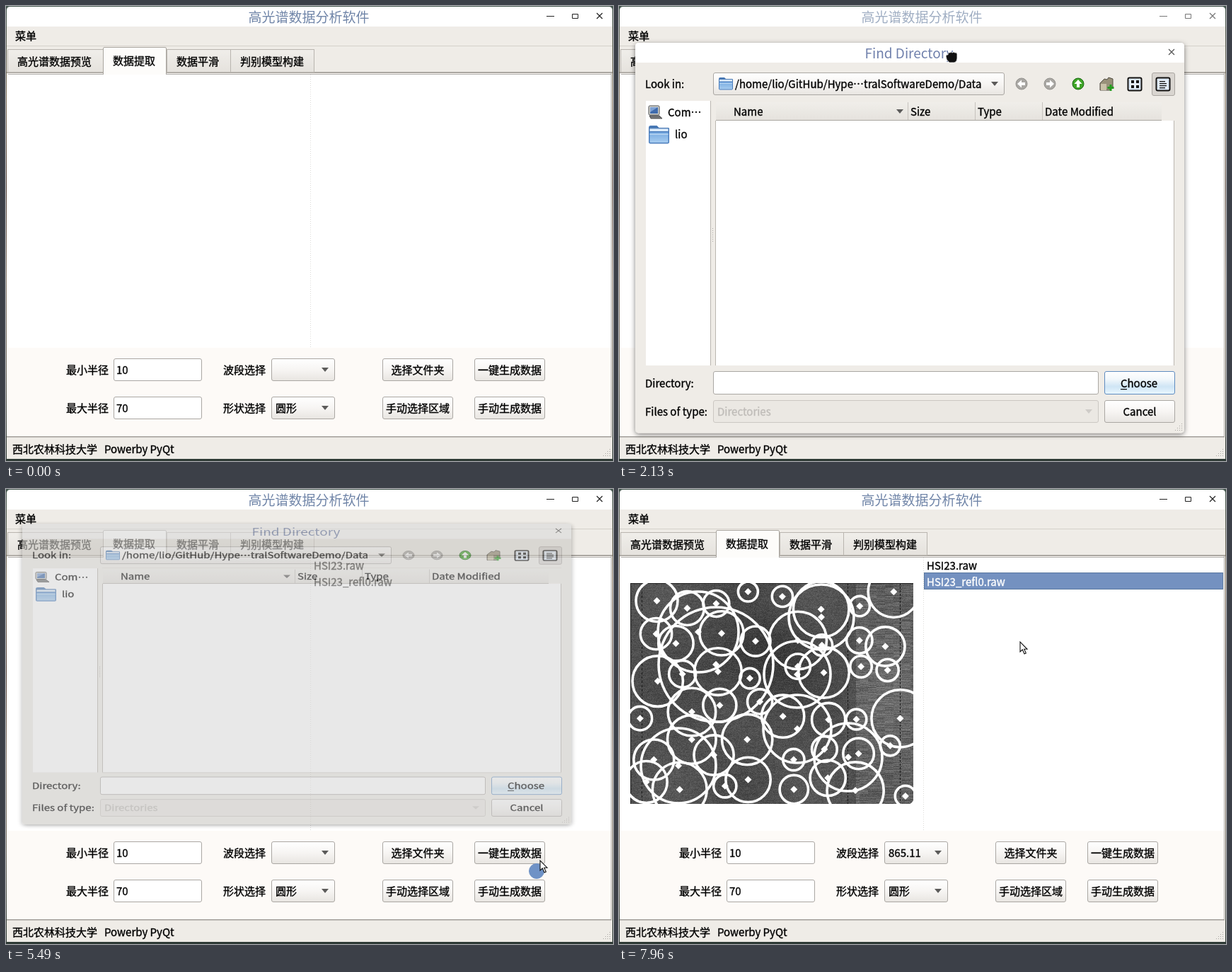
An HTML page with a canvas for the animation above (8 s loop, 858x643 px).

```html
<!DOCTYPE html>
<html lang="zh-CN">
<head>
<meta charset="utf-8">
<title>高光谱数据分析软件</title>
<style>
html, body { margin: 0; width: 100%; height: 100%; overflow: hidden; background: #4a4c45; }
svg { position: absolute; left: 0; top: 0; }
canvas { position: absolute; left: 16px; top: 133px; }
text {
  font: 15px "Noto Sans CJK SC", "Noto Sans CJK", "Noto Sans", sans-serif; font-weight: 500; white-space: pre;
  fill: currentColor; stroke: currentColor; stroke-width: .35px;
}
.title { font-size: 19px; font-weight: 400; text-anchor: middle; stroke: none; }
.mid { text-anchor: middle; }
</style>
</head>
<body>
<svg id="stage" width="858" height="643" viewBox="0 0 858 643"></svg>
<canvas id="scan" width="400" height="312"></canvas>
<script>
const LOOP = 8000;
const USER = 'lio';
const DEMO = `/home/${USER}/GitHub/HyperspectralSoftwareDemo`;

// ---- drawing helpers ----
const times = (n, make) => Array.from({ length: n }, (_, i) => make(i)).join('');
const rect = (x, y, w, h, fill, more = '') =>
  `<rect x="${x}" y="${y}" width="${w}" height="${h}" fill="${fill}" ${more}/>`;
const text = (x, y, s, more = '') => `<text x="${x}" y="${y + 5.5}" ${more}>${s}</text>`;
const title = (x, y, s, more) => text(x, y + 1.5, s, `class="title" ${more}`);
const path = (d, more = '') => `<path d="${d}" ${more}/>`;
const line = (d, color, w = 1) => path(d, `fill="none" stroke="${color}" stroke-width="${w}"`);
const box = (x, y, w, h, fill, stroke, r = 2.5, more = '') =>
  rect(x + .5, y + .5, w - 1, h - 1, fill, `stroke="${stroke}" rx="${r}" ${more}`);
const group = (id, body, more = '') => `<g id="${id}" ${more}>${body}</g>`;
const at = (x, y, body, s = 1) => `<g transform="translate(${x} ${y}) scale(${s})">${body}</g>`;
const ramp = (id, ...colors) => `<linearGradient id="${id}" x2="0" y2="1">` + colors.map((c, i) =>
  `<stop offset="${i / (colors.length - 1)}" stop-color="${c}"/>`).join('') + '</linearGradient>';

const arrow = (x, y, color = '#5c5b5a') => path(`M${x - 5} ${y - 3}h10l-5 6z`, `fill="${color}"`);
const button = (x, y, w, label) =>
  box(x, y, w, 32, 'url(#btn)', '#aaa7a3') + text(x + w / 2, y + 16, label, 'class="mid"');
const combo = (x, y, w, label) => box(x, y, w, 32, 'url(#btn)', '#aaa7a3') + label + arrow(x + w - 14, y + 16);
const field = (x, y, w, h, more = '') => box(x, y, w, h, '#fff', '#aaa7a3', 2.5, more);
const dots = (x, y, n) => times(n, i => rect(x, y + i * 3, 1, 1, '#aaa7a3'));
const grip = (x, y) => times(4, i => dots(x + i * 3, y + 9 - i * 3, i + 1));

// ---- icons ----
const folder = (x, y, s) => at(x, y,
  path('M0 2q0-2 2-2h6l2 2h9q1 0 1 1v4H0z', 'fill="#4878b4"') +
  rect(1, 3, 18, 4, '#dcebfa') +
  rect(.5, 6, 19, 11, 'url(#fold)', 'stroke="#4a7dbd" rx="1"') + rect(1, 8, 18, 1, '#b9d6f2'), s);
const computer = (x, y) => at(x, y,
  rect(1, 1, 15, 13, '#d4d5d0', 'stroke="#4b4d4f" rx="1.5"') + rect(3, 3, 11, 9, '#3f6bac') +
  path('M3 3h11l-11 7z', 'fill="#7da0d3"') +
  path('M2 15h14l4 4H4z', 'fill="#77787a" stroke="#333" stroke-width=".8"'));
const drive = (x, y) => at(x, y, rect(1, 0, 18, 19, '#c4d5e8', 'stroke="#7b93b0" rx="2"') +
  rect(4, 2, 12, 9, '#9bb9dc') + times(4, i => rect(4 + i * 3, 14, 1.5, 3, '#71879f')));
const newFolder = (x, y) => at(x, y,
  path('M1 8l6-6 4 1 2-3 6 2v12l-5 4H1z', 'fill="#99917a" stroke="#504c42"') +
  path('M2 9h8v9H2z', 'fill="#c9c1a8"') + line('M16 10v9m-4.500-4.500h9', '#269b20', 3));
const disc = (x, color, edge, turn) => at(x, 110,
  `<circle r="8" fill="${color}" stroke="${edge}"/>` +
  path('M0-6L-5.500 0h3.500v5h4V0h3.500z', `fill="#fff" transform="rotate(${turn})"`));
const view = (x, marks) => box(x - 10, 101, 20, 19, '#fff', '#111', 2, 'stroke-width="2"') +
  box(x - 8, 103, 16, 15, '#e6eff8', '#c9dcf0', 1) + marks;
const cross = (x, y) => path(`M${x - 4} ${y - 4}l8 8m0-8l-8 8`, 'fill="none" stroke="currentColor" stroke-width="1.2"');

// ---- main window ----
const tab = (x, w, label) => rect(x + .5, 61.5, w, 32, 'url(#tab)', 'stroke="#b9b5af"') + text(x + 14, 78, label);
const mainWindow = () =>
  rect(0, 0, 858, 643, 'url(#desk)') +
  rect(1, 20, 856, 620, '#efece7') + path('M1 29V6q0-5 5-5h846q5 0 5 5v23z', 'fill="#fff"') +
  group('head', title(428, 16, '高光谱数据分析软件', 'id="caption"') +
    line('M764 14.500h11M800.500 11.500h8v6h-8z', 'currentColor') + cross(839, 14)) +
  text(13, 42, '菜单') + rect(1, 56, 856, 1, '#d5d1cb') +
  rect(1, 94, 856, 515, '#fdfaf7') + rect(1, 93, 856, 2, '#aaa6a0') +
  rect(3, 96, 852, 387, '#fff') + rect(3, 96, 852, 1, '#b0aeab') +
  rect(855, 94, 1, 514, '#aaa7a2') + rect(1, 608, 855, 1.5, '#a19e99') +
  path('M430.500 97V483', 'stroke="#dcdad7" stroke-dasharray="1 2"') +
  tab(2, 135, '高光谱数据预览') + tab(227, 90, '数据平滑') + tab(317, 118, '判别模型构建') +
  path('M137.500 96V60q0-1.500 1.500-1.500h86q1.500 0 1.500 1.500V96', 'fill="#fdfcfa" stroke="#aaa6a0"') +
  rect(138, 93, 88, 4, '#fdfcfa') + text(151, 77, '数据提取') +
  text(85, 514, '最小半径') + field(152, 498, 125, 32) + text(156, 514, '10') +
  text(85, 568, '最大半径') + field(152, 552, 125, 32) + text(156, 568, '70') +
  text(307, 514, '波段选择') + combo(375, 498, 90, text(381, 514, '865.11', 'id="band"')) +
  text(307, 568, '形状选择') + combo(375, 552, 90, text(381, 568, '圆形')) +
  button(532, 498, 100, '') + rect(533, 509, 98, 20, '#d4e9f8', 'id="hover" opacity=".65"') +
  text(582, 514, '选择文件夹', 'class="mid"') + button(662, 498, 100, '一键生成数据') +
  button(532, 552, 100, '手动选择区域') + button(662, 552, 100, '手动生成数据') +
  text(9, 626, '西北农林科技大学') + text(139, 626, 'Powerby PyQt') + grip(844, 626) +
  group('files', box(431, 118, 423, 24, '#7491c0', '#58779f', 0, 'id="pick"') +
    text(435, 108, 'HSI23.raw') + text(435, 131, 'HSI23_refl0.raw', 'id="picked"'));

// ---- directory dialog ----
const column = (x, s) => rect(x - 4, 136, 1, 25, '#c6c2bd') + text(x, 149, s);
const dialog = () =>
  rect(23, 52, 776, 551.5, '#efece7', 'rx="5" filter="url(#shade)"') +
  path('M23 80V57q0-5 5-5h766q5 0 5 5v23z', 'fill="#fff"') +
  title(410, 67, 'Find Directory', 'color="#7080ac"') + `<g color="#555">${cross(781, 65)}</g>` +
  text(37, 110, 'Look in:') +
  combo(133, 94, 412, folder(141, 101) + text(164, 110, DEMO.replace('rspec', '…') + '/Data')) +
  disc(569, '#a9a7a3', '#94928e', -90) + disc(609, '#a9a7a3', '#94928e', 90) + disc(649, '#3fa527', '#166610', 0) +
  newFolder(679, 101) + box(753, 94, 33, 33, '#d9d5d0', '#aaa6a1') +
  view(729, times(4, i => rect(724 + i % 2 * 7, 105 + (i >> 1) * 7, 4, 4, '#111'))) +
  view(769, times(4, i => rect(764, 106 + i * 3, i % 3 ? 10 : 8, 1.3, '#111'))) +
  rect(38, 134, 91, 374, '#fff') + rect(129, 134, 1, 374, '#bab6b0') +
  computer(41, 140) + text(69, 150, 'Com…') + folder(42, 169, 1.45) + text(79, 181, USER) + dots(132, 314, 7) +
  box(136, 133, 649, 376, '#fff', '#bab6b0', 0) + rect(136, 133, 649, 29, '#efece7') +
  rect(137, 136, 630, 26, 'url(#tab)') + rect(137, 161, 630, 1, '#aaa7a1') + rect(136, 508, 649, 1, '#efece7') +
  text(162, 149, 'Name') + arrow(397, 149) + column(412, 'Size') + column(507, 'Type') + column(602, 'Date Modified') +
  text(37, 533, 'Directory:') + field(133, 516, 545, 33, 'id="dir"') + rect(137, 521, 1, 23, '#000', 'id="caret"') +
  text(37, 573, 'Files of type:') + box(133, 557, 545, 32, '#ebe8e3', '#cbc7c2') +
  text(139, 573, 'Directories', 'color="#bfbcb8"') + arrow(664, 573, '#cfccc8') +
  box(686, 516, 100, 33, 'url(#choose)', '#5f8cc0') + text(735, 533, 'Choose', 'class="mid"') +
  rect(709, 541, 9, 1.2, '#000') + button(686, 557, 100, 'Cancel') + grip(786, 590);

// ---- drop-down list ----
const ROW = 32.45;
const places = [DEMO + '/Data', DEMO, `/home/${USER}/GitHub`, `/home/${USER}`, '/home', '/',
  'Computer', 'Recent Places', DEMO, DEMO + '/Data'];
const icons = { '/': drive, Computer: computer, 'Recent Places': () => '' };
const popup = () =>
  rect(133, 94, 433, 327, '#efece7', 'stroke="#b3b0aa" filter="url(#shade)"') +
  box(134, 96, 431, 33, '#7491c0', '#58779f', 0, 'id="bar"') +
  places.map((s, i) => {
    const y = 112 + i * ROW;
    return (icons[s] || folder)(147, Math.round(y - 9)) + text(s === 'Recent Places' ? 143 : 178, y, s, 'class="place"');
  }).join('');

const pointer =
  path('M0 0V14L3.300 11 6 17 8.300 16 5.700 10.300H10z', 'fill="#fff" stroke="#111" stroke-width="1.1" id="arrow"') +
  path('M-7-1q0-3 3-2 0-4 3-3 1-2 3 0 2-2 4 0 3-1 3 2v6q0 5-4 6h-7q-5-4-5-9z',
    'fill="#111" stroke="#fff" stroke-width=".8" id="fist"');

const $ = id => document.getElementById(id);
$('stage').innerHTML = '<defs>' +
  ramp('btn', '#ffffff', '#f7f5f3', '#e8e5e1') + ramp('tab', '#f0eeea', '#e5e2dd') +
  ramp('choose', '#ffffff', '#f3f8fb', '#cfe5f5', '#e9f7ff') + ramp('fold', '#75a9e0', '#a8cdf0') +
  ramp('desk', '#44564e', '#8b7c68', '#5c4b43', '#94877a', '#777268', '#2e3a35') +
  '<filter id="shade" x="-5%" y="-5%" width="110%" height="112%">' +
  '<feDropShadow dx="0" dy="2" stdDeviation="3.5" flood-opacity=".5"/></filter></defs>' +
  group('main', mainWindow()) + group('dialog', dialog()) + group('popup', popup()) +
  '<circle id="ripple" stroke="#6f92c6"/>' + group('cursor', pointer);

// ---- scanned image with detected circles ----
function paintScan() {
  const g = $('scan').getContext('2d');
  let seed = 7;
  const rnd = () => (seed = seed * 16807 % 2147483647) / 2147483647;
  const img = g.createImageData(400, 312);
  for (let y = 0; y < 312; y++) {
    let streak = 0;
    for (let x = 0; x < 400; x++) {
      if (x % 12 === 0) streak = rnd() - .5;
      const bright = x > 318 ? 20 : 0;
      const dip = 26 * Math.exp(-(((x - 180) / 70) ** 2) - ((y - 110) / 60) ** 2);
      let v = 80 + bright - dip + 7 * Math.sin(x / 33) * Math.cos(y / 47) + (rnd() - .5) * 26 + streak * (bright ? 34 : 10);
      if (x === 16 && y % 6 < 3 || (x === 307 || x === 381) && y % 5 < 3) v = 25;
      if (x < 1 || y < 1) v = 30;
      img.data.set([v, v, v, 255], (y * 400 + x) * 4);
    }
  }
  g.putImageData(img, 0, 0);
  g.strokeStyle = g.fillStyle = '#fff';
  g.lineWidth = 3.6;
  const mark = (x, y, r) => {
    g.beginPath();
    g.arc(x, y, r, 0, 7);
    g.stroke();
    g.fill(new Path2D(`M${x - 5} ${y}l5-5 5 5-5 5z`));
  };
  // The widest circles are placed; the rest scatter over a jittered grid.
  [[96, 69, 57], [121, 115, 81], [68, 258, 53], [236, 129, 47], [308, 246, 48], [270, 48, 46], [236, 206, 48]]
    .forEach(c => mark(...c));
  for (let i = 0; i < 48; i++) {
    const x = (i % 8 + .2 + .6 * rnd()) * 50, y = ((i >> 3) + .2 + .6 * rnd()) * 52;
    mark(x, y, 14 + 28 * rnd() ** 1.8);
  }
}
paintScan();

// ---- timeline: cursor moves as start, end, x, y ----
const moves = [
  [900, 1320, 360, 89], [1360, 2130, 469, 72], [2260, 3020, 480, 112], [3200, 3570, 464, 186],
  [3600, 4450, 482, 112], [4770, 5290, 750, 540], [5400, 5570, 759, 513], [5570, 5980, 735, 409],
  [6120, 6760, 528, 134], [7500, 7640, 572, 205], [7950, 7960, 567, 216]];
const clicks = [540, 3100, 4500, 5370, 7390];

const clamp = v => Math.max(0, Math.min(1, v));
const smooth = v => v * v * (3 - 2 * v);
const show = (id, on) => { $(id).style.display = on ? '' : 'none'; };
const set = (id, attrs) => { for (const k in attrs) $(id).setAttribute(k, attrs[k]); };

function place(t) {
  return moves.reduce(([x, y], [from, to, nx, ny]) => {
    const p = smooth(clamp((t - from) / (to - from)));
    return [x + (nx - x) * p, y + (ny - y) * p];
  }, [599, 519]).map(Math.round);
}

function drawRipple(t) {
  const hit = clicks.find(c => t >= c && t < c + 280);
  show('ripple', hit);
  if (!hit) return;
  const age = t - hit, held = age < 140, [cx, cy] = place(hit);
  set('ripple', {
    cx, cy, r: held ? Math.min(10.5, 4 + age / 10) : 10.5 + (age - 140) / 60,
    fill: held ? '#6f92c6' : 'none', 'stroke-width': held ? 1 : 5.5 - (age - 140) / 50
  });
}

function drawDialog(t, x, y) {
  const closing = t >= 5400;
  const p = closing ? 1 - clamp((t - 5400) / 207) : clamp((t - 640) / 267);
  const drag = t < 2130;
  const dx = drag ? Math.max(x, 360) - 469 : 0;
  const dy = drag ? Math.min(y, 89) - 72 : closing ? -7 * (1 - p) : 0;
  show('dialog', p > 0);
  // Tilts around its top edge while it fades.
  const [left, top] = t < 1360 ? [-109, 17] : [dx, dy];
  set('dialog', { transform: `translate(${left} ${52 + top}) scale(1 ${Math.sin(p * Math.PI / 2)}) translate(0 -52)` });
  $('dialog').style.opacity = closing ? .15 + .85 * p : Math.min(1, p * 1.13);
  $('dialog').style.filter = p < 1 ? `brightness(${Math.min(1, .55 + .55 * p)})` : '';
  const focus = t < 1360 || t >= 2260 && t < 3160;
  set('dir', { stroke: focus ? '#5f8cc0' : '#aaa7a3', 'stroke-width': focus ? 1.6 : 1 });
  show('caret', focus);
}

function drawPopup(t, y) {
  show('popup', t >= 3160 && t < 4560);
  const row = Math.max(0, Math.floor((y - 96) / ROW));
  set('bar', { y: Math.round(95.7 + row * ROW) + .5 });
  document.querySelectorAll('.place').forEach((el, i) =>
    el.setAttribute('color', places[i] === 'Recent Places' ? '#c0bdb8' : i === row ? '#fff' : '#000'));
}

function draw(t) {
  const [x, y] = place(t);
  const idle = t >= 640 && t < 5420;
  const drag = t >= 1360 && t < 2260;
  set('caption', { color: idle ? '#a0aec3' : '#7085a8' });
  set('head', { color: idle ? '#777' : '#222' });
  set('picked', { color: t >= 7430 ? '#fff' : '#000' });
  show('hover', t >= 140 && t < 5420);
  show('files', t >= 5420);
  show('pick', t >= 7430);
  show('band', t >= 7600);
  show('scan', t >= 7600);
  drawDialog(t, x, y);
  drawPopup(t, y);
  drawRipple(t);
  show('cursor', t >= 520);
  show('arrow', !drag);
  show('fist', drag);
  set('cursor', { transform: `translate(${x} ${y})` });
}

const tick = () => {
  draw(performance.now() % LOOP);
  requestAnimationFrame(tick);
};
tick();
</script>
</body>
</html>
```
